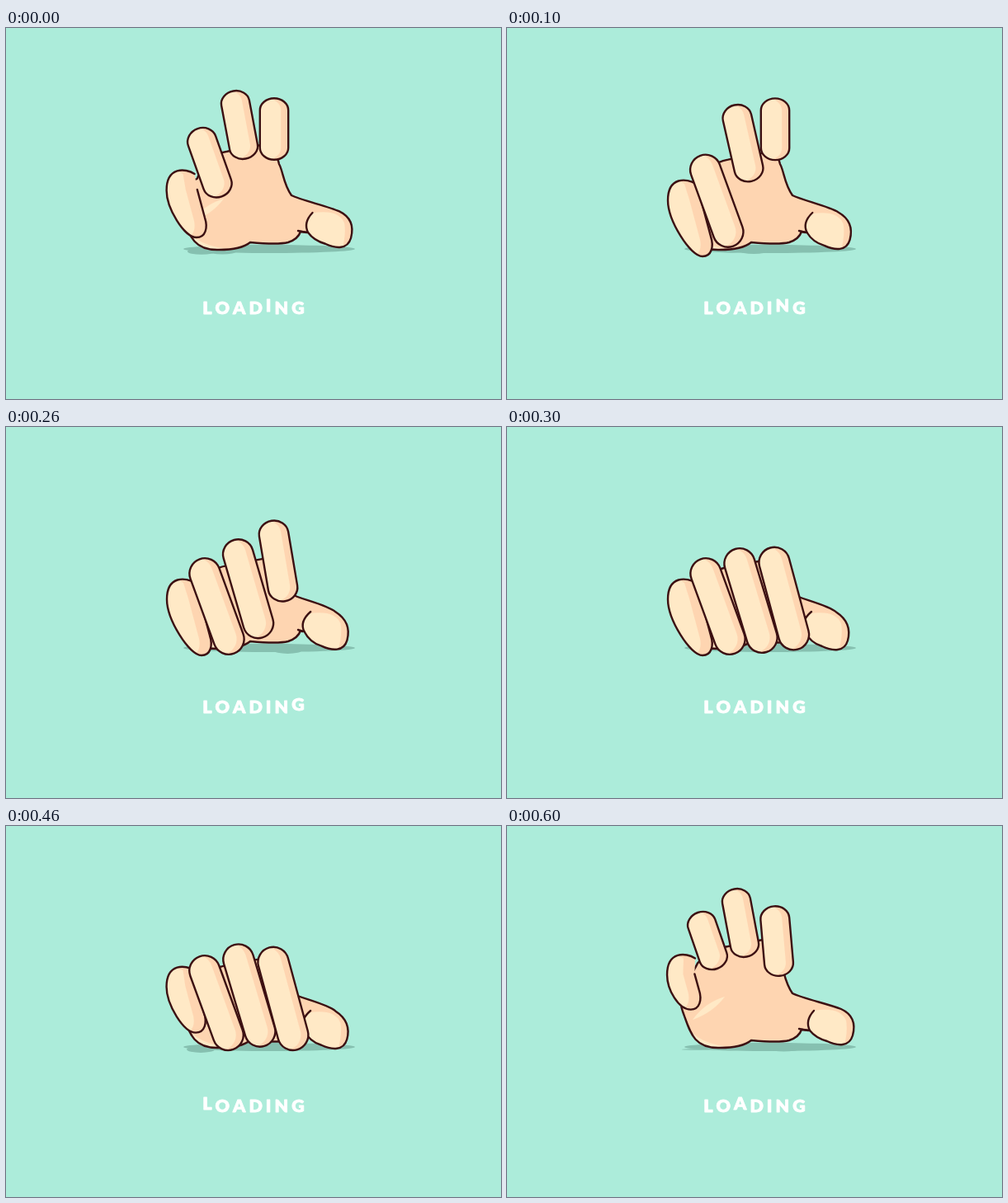
These frames come from a looping animation (600 by 450 pixels, 700 ms). An HTML page with a canvas:

```html
<!DOCTYPE html>
<html lang="en">
<head>
<meta charset="utf-8">
<title>Loading</title>
<style>
  html, body { margin: 0; height: 100%; overflow: hidden; background: #acecda; }
  canvas { display: block; }
</style>
</head>
<body>
<canvas id="stage" width="600" height="450"></canvas>
<script>
const ctx = document.getElementById('stage').getContext('2d');
const BACK = '#acecda', INK = '#3c1012', SKIN = '#fed5b1', LIGHT = '#ffe9c6', SHADOW = '#86c0b0';
const STEP = 100, LOOP = 700;

// Each finger eases between two poses [topX, topY, bottomX, bottomY];
// press and lift are the start and end of those moves in ms.
const fingers = [
  { up: [211, 154, 222, 221], down: [212, 184, 237, 278], press: [-130, 100], lift: [305, 505] },
  { up: [236, 103, 250, 175], down: [241, 158, 270, 277], press: [-85, 145], lift: [385, 515] },
  { up: [278, 75, 288, 160], down: [282, 146, 309, 275], press: [27, 257], lift: [372, 572] },
  { up: [325, 84, 325, 161], down: [324, 146, 348, 274], press: [93, 320], lift: [385, 685] }
];

function ease(t, [from, to]) {
  const x = Math.min(1, Math.max(0, (t - from) / (to - from)));
  return x * x * (3 - 2 * x);
}

const mix = (a, b, k) => a + (b - a) * k;
const curl = ({ press, lift }, t) => ease(t, press) - ease(t, lift) + ease(t - LOOP, press);

function stroke(path) {
  ctx.strokeStyle = INK;
  ctx.stroke(path);
}

function fill(path, color) {
  ctx.fillStyle = color;
  ctx.fill(path);
}

// Skin shape with a darker band along its right side
function shaded(path, band) {
  fill(path, SKIN);
  ctx.save();
  ctx.clip(path);
  ctx.translate(-band, 0);
  fill(path, LIGHT);
  ctx.restore();
  stroke(path);
}

function finger({ k, pose: [tx, ty, bx, by] }) {
  const r = 17.2 + 1.4 * k;
  const cap = r * (0.85 + 0.15 * k);
  const top = ty + cap + 1.2, bottom = by - cap - 1.2;
  const tilt = Math.atan2(bx - tx, bottom - top);
  const path = new Path2D();
  path.ellipse(tx, top, r, cap, -tilt, Math.PI, 2 * Math.PI);
  path.ellipse(bx, bottom, r, cap, -tilt, 0, Math.PI);
  path.closePath();
  shaded(path, 9);
}

function littleFinger({ k, pose: [tx, ty, bx, by] }) {
  const left = tx - 17, low = by - 1;
  shaded(new Path2D(`M${tx + 17} ${ty + 5}
    C${tx + 6} ${ty - 2} ${left} ${ty - 4} ${left} ${ty + 25}
    C${left} ${ty + 25 + (by - ty) * 0.26} ${bx - 15} ${low} ${bx} ${low}
    C${bx + 11} ${low} ${bx + 14} ${by - 13} ${bx + 10} ${by - 25}
    L${tx + 16 + 7 * k} ${ty + 24}`), 14);
}

function palm(fist, [px, py]) {
  const drop = 24 * fist - 4, dx = -6 * fist, dy = 5 * fist;
  const path = new Path2D(`M${px + 20} ${py + 11} C240 ${160 + drop} 255 ${152 + drop} 268 ${150 + drop}
    L310 ${142 + drop} Q328 150 331 165 C336 174 336 189 346 203
    C358 209 390 216 ${405 + dx} ${222 + dy / 2}
    C${418 + dx} ${228 + dy} ${423 + dx} ${239 + dy} ${419 + dx} ${254 + dy}
    C${415 + dx} ${268 + dy} ${401 + dx} ${267 + dy} ${388 + dx} ${261 + dy}
    Q${374 + dx} ${257 + dy} ${367 + dx} 248 L357 247 Q354 256 342 260 Q330 263 296 260
    Q285 269 258 269 C226 270 222 250 213 225 C205 205 222 185 ${px + 20} ${py + 11}Z`);
  fill(path, SKIN);
  ctx.save();
  ctx.clip(path);
  fill(new Path2D('M205 215 Q216 262 264 267 L240 278 L200 255Z'), LIGHT);
  fill(new Path2D('M264 207 Q240 214 225 235 Q250 226 264 207Z'), LIGHT);
  ctx.translate(dx, dy / 2);
  fill(new Path2D('M372 224 Q404 219 411 236 Q414 252 406 275 L372 262 L366 248 Q360 236 372 224Z'), LIGHT);
  ctx.restore();
  stroke(path);
  stroke(new Path2D(`M${372 + dx / 2} 224 Q${361 + dx} 236 ${367 + dx} 248 M354 246 L${365 + dx} 248`));
}

// The ground shadow bulges under fingers that are on their way
function shadow(hand) {
  const path = new Path2D();
  path.ellipse(319, 268, 104, 5, 0, 0, 7);
  fill(path, SHADOW);
  for (const { k, pose } of hand) {
    const bulge = new Path2D();
    bulge.ellipse(pose[2] + 6, 271, 17, 16 * k * (1 - k), 0, 0, 7);
    fill(bulge, SHADOW);
  }
}

function caption(text, raised) {
  const gap = 4;
  ctx.font = '900 21.5px Lato, sans-serif';
  ctx.fillStyle = ctx.strokeStyle = '#fff';
  ctx.lineWidth = 0.8;
  const widths = [...text].map(c => ctx.measureText(c).width + gap);
  let x = 300 - (widths.reduce((a, b) => a + b) - gap) / 2;
  [...text].forEach((c, i) => {
    const y = i === raised ? 344 : 346.5;
    ctx.fillText(c, x, y);
    ctx.strokeText(c, x, y);
    x += widths[i];
  });
}

function draw(t) {
  const hand = fingers.map(f => {
    const k = curl(f, t);
    return { k, pose: f.up.map((v, i) => mix(v, f.down[i], k)) };
  });
  const [little, ...others] = hand;
  const fist = (hand[1].k + hand[2].k) / 2;
  ctx.fillStyle = BACK;
  ctx.fillRect(0, 0, 600, 450);
  ctx.lineWidth = 2.4;
  ctx.lineCap = ctx.lineJoin = 'round';
  shadow(hand);
  palm(fist, little.pose);
  littleFinger(little);
  others.forEach(finger);
  // The hop runs one letter per step and rests for one step after the last
  caption('LOADING', (t / STEP + 5) % 8 - 1 - (t >= 3 * STEP ? 0 : 0) === -1 ? -1 : t < 3 * STEP ? t / STEP + 4 : t / STEP - 4);
}

const start = performance.now();
function tick() {
  const t = (performance.now() - start) % LOOP;
  draw(Math.floor(t / STEP) * STEP);
  requestAnimationFrame(tick);
}
tick();
</script>
</body>
</html>
```
